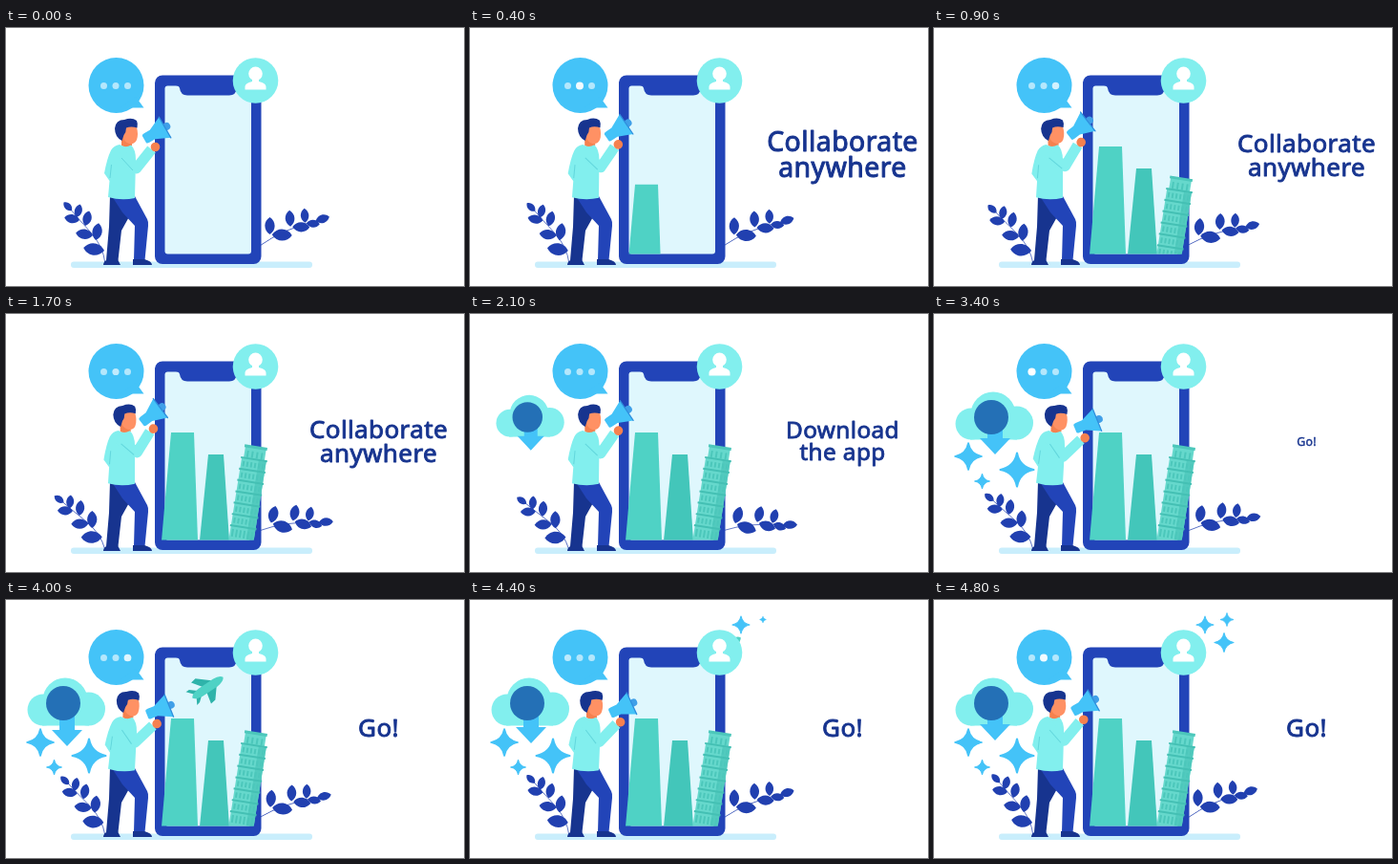
Write an HTML page that moves like this. It is 480 px wide and 270 px high and loops after 4.9 s.

```html
<!DOCTYPE html>
<html lang="en">
<head>
<meta charset="utf-8">
<title>Collaborate anywhere</title>
<style>
html, body { margin: 0; width: 100%; height: 100%; overflow: hidden; background: #fff; }
svg { display: block; width: 480px; height: 270px; }
text {
  font: 400 26px "Noto Sans", "Open Sans", sans-serif; letter-spacing: .4px; text-anchor: middle;
  fill: #17348f; stroke: #17348f; stroke-width: .9px; stroke-linejoin: round;
}
</style>
</head>
<body>
<svg viewBox="0 0 480 270">
  <defs>
    <clipPath id="floor"><rect x="150" y="90" width="130" height="146.5"/></clipPath>
    <path id="star" d="M0-1Q.16-.16 1 0Q.16.16 0 1Q-.16.16-1 0Q-.16-.16 0-1Z"
      fill="#44c3f8" stroke="#44c3f8" stroke-width=".12" stroke-linejoin="round"/>
  </defs>

  <rect x="68" y="244.5" width="253" height="6.5" rx="3" fill="#c9eefc"/>
  <g id="leftPlant" fill="#2140b0"></g>
  <g id="rightPlant" fill="#2140b0"></g>

  <!-- phone -->
  <rect x="156" y="49.500" width="111.500" height="197.500" rx="8" fill="#2244b8"/>
  <rect x="166.500" y="60.500" width="90.500" height="176" rx="3" fill="#dff7fd"/>
  <path d="M178 60Q181.500 60.500 182 63Q183 70.500 190 70.500H234Q241 70.500 242 63Q242.500 60.500 246 60Z" fill="#2244b8"/>

  <!-- landmarks -->
  <g clip-path="url(#floor)">
    <path id="pillarA" d="M173 124H197L201 237H163Z" fill="#4fd2c5"/>
    <path id="pillarB" d="M212 147H228L234 237H203Z" fill="#43c6ba"/>
    <g id="tower"></g>
  </g>

  <g id="plane">
    <path d="M-3-3L-11-14L-5-15L8-4ZM-3 3L-6 16L0 15L9 4Z" fill="#2fb3aa"/>
    <path d="M-15-2L-21-9L-17-9L-10-3ZM-15 2L-19 9L-15 8L-9 3Z" fill="#2fb3aa"/>
    <path d="M-19 0Q-17-4 -8-4.500H10Q18-4 20 0Q18 4 10 4.500H-8Q-17 4-19 0Z" fill="#4fd2c5"/>
  </g>

  <!-- avatar -->
  <circle cx="261.500" cy="55" r="23.800" fill="#82efee"/>
  <circle cx="261.500" cy="47.800" r="7.300" fill="#fff"/>
  <path d="M250.500 64.500V61.500Q250.500 57.500 258 56V52H265V56Q272.500 57.500 272.500 61.500V64.500Z" fill="#fff"/>

  <!-- download cloud -->
  <g id="cloud">
    <g fill="#82efee">
      <circle cx="39" cy="115" r="16.500"/>
      <circle cx="62" cy="105" r="23.500"/>
      <circle cx="86.500" cy="114" r="17.500"/>
      <rect x="38" y="108" width="49" height="23.500"/>
    </g>
    <path id="arrow" d="M56 116H72V132H80L64 149L48 132H56Z" fill="#44c3f8"/>
    <circle cx="60" cy="108" r="18" fill="#2470b6"/>
  </g>
  <g id="stars"></g>

  <!-- speech bubble -->
  <circle cx="115.500" cy="60" r="29" fill="#44c3f8"/>
  <path d="M120 83.500H144.500L136 72Z" fill="#44c3f8"/>
  <g id="dots" fill="#fff">
    <circle cx="102.500" cy="60.500"/><circle cx="115" cy="60.500"/><circle cx="127.500" cy="60.500"/>
  </g>

  <!-- man -->
  <path d="M109 175H130L131 194L121 212L117.500 243H105L108 208Z" fill="#17348f"/>
  <path d="M111 176H135L148 200Q149.500 203 149 207L145.500 243H134L135 207L122 193Z" fill="#2244b8"/>
  <path d="M102 248Q102 244 107 242H117L120 248ZM133 242H145Q153 244 153 248H133Z" fill="#17348f"/>
  <g id="torso">
    <path d="M121 113L132 117V123Q127 127 121 123Z" fill="#f5814f"/>
    <path d="M119 122Q125 126 131 122.500Q136 127 136 138L135 178Q121 181 107 177L108.500 160L103 152Q106 136 110 128Q113 123 119 122Z" fill="#82efee"/>
    <path d="M109 157L110.500 143" stroke="#62d6dc" stroke-width="1" fill="none"/>
    <path d="M122 103Q130 99 137 104Q139 111 137 117Q135 122 129 121Q123 119 122 112Z" fill="#ff9164"/>
    <path d="M121.500 118Q114 114 114 105Q115 96 124 96Q132 93 137 97Q138.500 100 137.500 104.500Q131 102.500 126 104.500Q126 109 123.500 112Z" fill="#17348f"/>
    <g id="arm">
      <path d="M119 131L136.500 147L152.500 127" fill="none" stroke="#82efee" stroke-width="11" stroke-linejoin="round"/>
      <path d="M121 136L133 149" stroke="#62d6dc" stroke-width="1"/>
      <circle cx="156.500" cy="124.500" r="4.800" fill="#f5814f"/>
      <g transform="translate(157 109.500) rotate(-30)">
        <circle cx="13" cy="0" r="4" fill="#3f9fe8"/>
        <path d="M-14-4Q-14-5.500-11-5.500L-4-5.500L11-12.500V12.500L-4 5.500H-11Q-14 5.500-14 4Z" fill="#44c3f8"/>
        <path d="M11-12.500V12.500" stroke="#2f8fdd" stroke-width="1.300" stroke-linecap="round"/>
      </g>
    </g>
  </g>

  <!-- captions, centred on their own origin -->
  <g id="captionA"><text y="-4.500">Collaborate</text><text y="20.500">anywhere</text></g>
  <g id="captionB"><text y="-4.500">Download</text><text y="20.500">the app</text></g>
  <g id="captionC"><text y="9">Go!</text></g>
</svg>

<script>
const LOOP = 4900, STEP = 100;
const $ = id => document.getElementById(id);
const move = (el, value) => el.setAttribute('transform', value);
const clamp = v => Math.max(0, Math.min(1, v));
const span = (t, start, length) => clamp((t - start) / length);
const easeOut = p => 1 - (1 - p) ** 3;
const easeBack = p => p && 1 + 2.7 * (p - 1) ** 3 + 1.7 * (p - 1) ** 2;
const wave = (t, period) => Math.sin(2 * Math.PI * t / period);
const scaleAt = (el, x, y, s) => move(el, `translate(${x} ${y}) scale(${s})`);

// each leaf: root x, root y, angle, length
const leaf = ([x, y, angle, n]) =>
  `<path transform="translate(${x} ${y}) rotate(${angle}) scale(${n})" d="M0 0C.25-.38 .75-.38 1 0C.75.38 .25.38 0 0Z"/>`;
const plant = (id, stem, leaves) => {
  $(id).innerHTML = `<path d="${stem}" fill="none" stroke="#2140b0" stroke-width=".7"/>` + leaves.map(leaf).join('');
};
plant('leftPlant', 'M104 247Q102 228 88 213Q78 202 67 189', [
  [69, 191, -135, 12], [74, 198, -75, 14], [83, 207, -75, 16], [94, 222, -80, 18],
  [77, 201, 190, 16], [91, 217, 188, 18], [103, 233, 188, 22]]);
plant('rightPlant', 'M-4 5Q25-4 62-1', [
  [10, -3, -72, 18], [33, -4, -75, 17], [49, -3, -75, 15],
  [12, -2, 20, 21], [35, -3, 20, 18], [50, -2, 22, 14], [60, -1, 0, 15]]);

// leaning tower: tiers of arches under a belfry
const block = (x, y, w, h, fill) => `<rect x="${x}" y="${y}" width="${w}" height="${h}" fill="${fill}"/>`;
const arches = (y, count, gap, h) => Array.from({ length: count }, (_, i) =>
  block((i - (count - 1) / 2) * gap - 1, y, 2, h, '#4cc7bb')).join('');
let tower = block(-13, -86, 26, 90, '#66d8cc') + block(5, -86, 8, 90, '#52cabe') +
  block(-11, -98, 22, 13, '#66d8cc') + block(-12, -100, 24, 3, '#4cc7bb') + arches(-94, 4, 5, 7);
for (let i = 0; i < 7; i++) {
  const y = -87 + i * 12;
  tower += block(-14, y, 28, 2, '#44c0b4') + arches(y + 4.5, 6, 4.1, i < 6 ? 5.5 : 8);
}
$('tower').innerHTML = tower;

// star: x, y, radius, start, duration
const stars = [
  [87, 163, 17.5, 2200, 700], [36, 149, 14, 2550, 700], [50.5, 175, 8, 2750, 600],
  [284, 26, 9, 4250, 400], [307, 20.5, 7, 4350, 400], [304, 44.5, 10, 4400, 400]];
$('stars').innerHTML = stars.map(() => '<use href="#star"/>').join('');

const captions = [
  ['captionA', 140, 1710], ['captionB', 1940, 3110], ['captionC', 3340, LOOP]];

function draw(t) {
  const sway = t < 2300 ? (1 - Math.cos(Math.PI * t / 2300)) / 2
    : (1 + Math.cos(Math.PI * (t - 2300) / (LOOP - 2300))) / 2;
  move($('leftPlant'), `rotate(${-11 * sway} 104 247)`);
  move($('rightPlant'), `translate(268 222) rotate(${18.4 * (sway - 1)})`);
  move($('torso'), `rotate(${-1.6 * wave(t, LOOP)} 121 178)`);
  move($('arm'), `rotate(${-7 * wave(t, LOOP)} 120 130)`);

  const sink = (start, height) => height * (1 - easeOut(span(t, start, 500)));
  move($('pillarA'), `translate(0 ${sink(250, 116)})`);
  move($('pillarB'), `translate(0 ${sink(450, 95)})`);
  move($('tower'), `translate(246.5 237) rotate(9) translate(0 ${sink(680, 104)})`);

  const k = (t - 4000) / 100;
  const climb = k < 0 ? 6 * k : 4 * k + 1.6 * k * k;
  move($('plane'), `translate(${211 + 1.35 * climb} ${92 - climb}) rotate(-34) scale(${easeOut(span(t, 3650, 350))})`);

  const c = easeOut(span(t, 1900, 400));
  move($('cloud'), `translate(62 108) scale(${c}) translate(-62 -108)`);
  move($('arrow'), `translate(0 ${1 + 3 * wave(t - 2300, 1400)})`);
  [...$('stars').children].forEach((el, i) => {
    const [x, y, r, start, length] = stars[i];
    scaleAt(el, x, y, r * easeBack(span(t, start, length)));
  });

  [...$('dots').children].forEach((el, i) => {
    const gap = Math.abs(t % 1100 - (140 + 325 * i));
    const glow = t < 100 ? 0 : clamp(1.4 - gap / 110);
    el.setAttribute('r', 3.5 + 0.6 * glow);
    el.setAttribute('opacity', 0.6 + 0.4 * glow);
  });

  for (const [id, start, end] of captions)
    scaleAt($(id), 390.5, 134, easeBack(span(t, start, 500)) * (1 - span(t, end, 200)));
}

function tick() {
  draw(Math.floor(performance.now() % LOOP / STEP) * STEP);
  requestAnimationFrame(tick);
}
tick();
</script>
</body>
</html>
```
